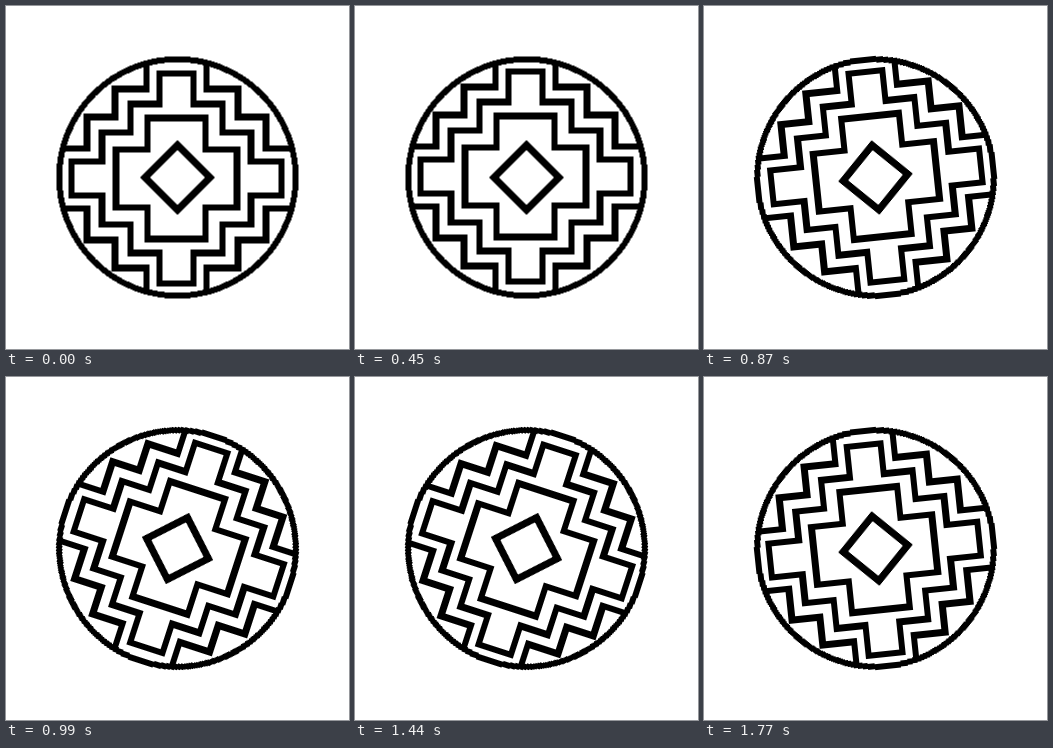
An HTML page that plays this animation: 343 px wide and 343 px high, repeating every 1.8 s.

```html
<!DOCTYPE html>
<html lang="en">
<head>
<meta charset="utf-8">
<title>Turning medallion</title>
<style>
  html, body {
    margin: 0;
    width: 100%;
    height: 100%;
    overflow: hidden;
    background: #fff;
  }
  svg {
    display: block;
    width: 100%;
    height: 100%;
  }
  .lines {
    fill: none;
    stroke: #000;
    stroke-width: 6.8;
    stroke-linejoin: miter;
    shape-rendering: crispEdges;
  }
  .ring { stroke-width: 6; }
  /* 6 degrees every 30 ms */
  .wheel {
    transform-origin: 0 0;
    animation: turn 1800ms steps(60) infinite;
  }
  @keyframes turn {
    from { transform: rotate(0deg); }
    to { transform: rotate(360deg); }
  }
</style>
</head>
<body>
<svg viewBox="0 0 343 343">
  <defs>
    <!-- One quarter of the stepped border: outer stair, then inner stair with half tabs -->
    <g id="quarter">
      <path d="M-30-115V-89.5H-61.5V-61.5H-89.5V-30H-115"/>
      <path d="M0-105H-17V-74.5H-46V-46H-74.5V-17H-105V0"/>
    </g>
  </defs>
  <g transform="translate(171.5 171.5)">
    <g class="wheel lines">
      <circle class="ring" r="118.3"/>
      <!-- The pattern sits slightly off the turning point -->
      <g transform="translate(-1 1)">
        <use href="#quarter"/>
        <use href="#quarter" transform="rotate(90)"/>
        <use href="#quarter" transform="rotate(180)"/>
        <use href="#quarter" transform="rotate(270)"/>
        <path d="M-29-60.5H29V-29H60.5V29H29V60.5H-29V29H-60.5V-29H-29Z"/>
      </g>
      <path d="M0-32.5L32.5 0L0 32.5L-32.5 0Z"/>
    </g>
  </g>
</svg>
</body>
</html>
```
